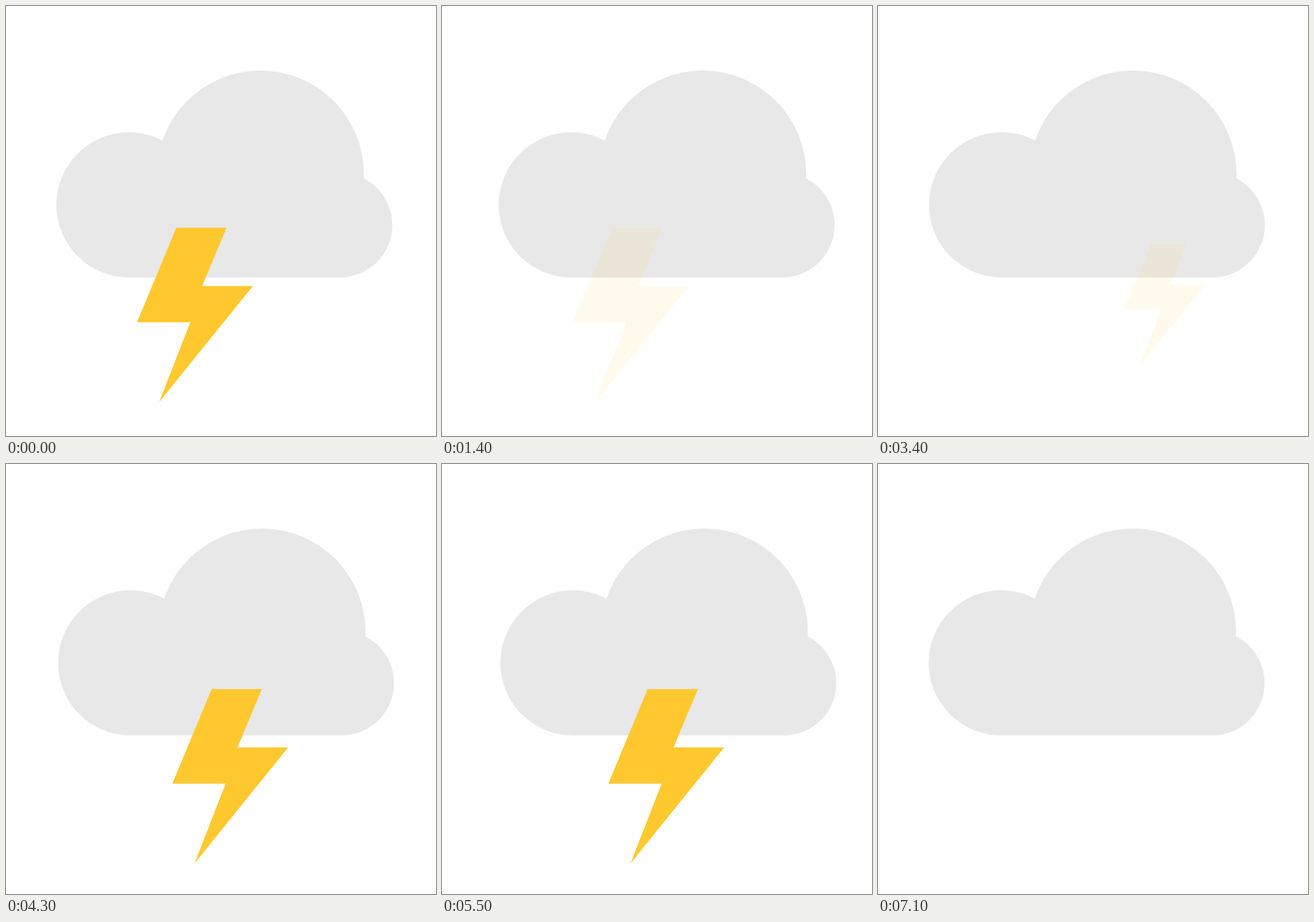
These frames come from a looping animation (640 px wide and 640 px high, 7.2 s). An HTML page:

```html
<!DOCTYPE html>
<html lang="en">
<head>
<meta charset="utf-8">
<title>Thunderstorm</title>
<style>
  html, body { margin: 0; width: 100%; height: 100%; overflow: hidden; background: #fff; }
  svg { display: block; width: 100vw; height: 100vh; }
</style>
</head>
<body>
<svg viewBox="0 0 640 640">
  <defs>
    <path id="bolt" d="M58.5 0H133.3L97 86.7H172.5L33 259.5L79.3 140.7H0Z"/>
  </defs>
  <g id="cloud" fill="#e8e8e8">
    <circle cx="183" cy="296" r="108"/>
    <circle cx="378.7" cy="250" r="154"/>
    <circle cx="497" cy="326" r="78"/>
    <path d="M183 270H497V404H183Z"/>
  </g>
  <g fill="#ffc82f">
    <use class="bolt" href="#bolt" transform="translate(195 330)"/>
    <use class="bolt" href="#bolt" transform="translate(366 353.8) scale(.7)"/>
    <use class="bolt" href="#bolt" transform="translate(247.6 335)"/>
  </g>
</svg>
<script>
const LOOP = 7200, STEP = 100;
const DRIFT = 3600, LAG = 140, REACH = 12;
const GAP = 2000, HOLD = 375, FADE_END = 1500;

const cloud = document.getElementById('cloud');
const bolts = document.querySelectorAll('.bolt');

// Hold, fade out linearly, then one last flash before vanishing.
function boltOpacity(age) {
  if (age < 0 || age >= FADE_END + STEP) return 0;
  if (age < HOLD || age >= FADE_END) return 1;
  return (FADE_END - age) / (FADE_END - HOLD);
}

function draw(now) {
  const t = Math.floor((now % LOOP) / STEP) * STEP;
  const phase = 2 * Math.PI * (t - LAG) / DRIFT;
  const x = REACH / 2 * (1 - Math.cos(phase)) - 0.2;
  cloud.setAttribute('transform', `translate(${x} 0)`);
  bolts.forEach((bolt, i) => bolt.setAttribute('opacity', boltOpacity(t - i * GAP)));
}

const start = performance.now();
function tick() {
  draw(performance.now() - start);
  requestAnimationFrame(tick);
}
tick();
</script>
</body>
</html>
```
